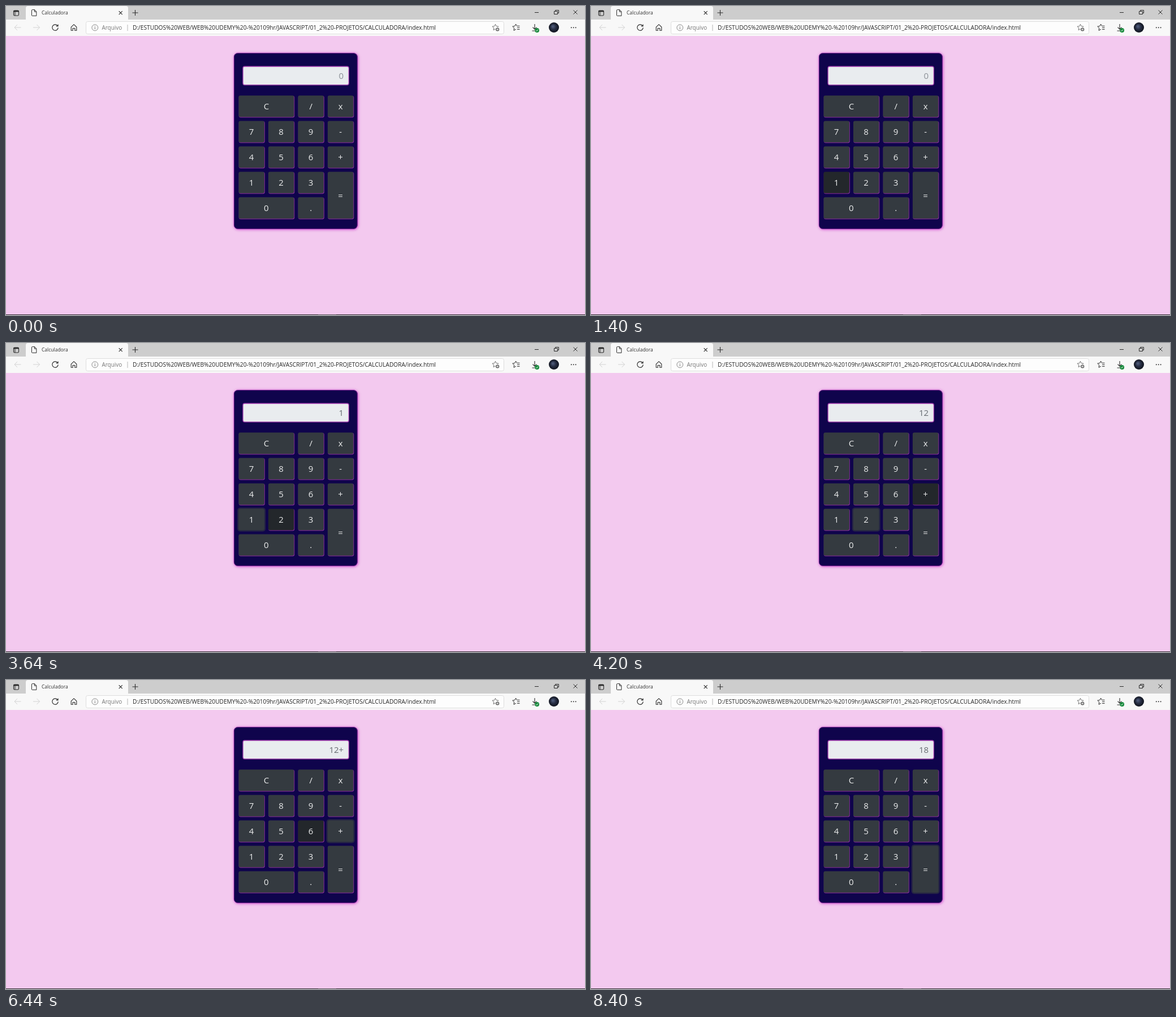
Recreate the animation shown at these times as an HTML page with a canvas. Size 1024 by 547 pixels, loop 9.8 s.

```html
<!DOCTYPE html>
<html lang="pt-BR">
<head>
<meta charset="utf-8">
<title>Calculadora</title>
<style>
html, body { margin: 0; width: 100%; height: 100%; overflow: hidden; background: #f3c9ef; }
canvas { display: block; width: 1024px; height: 547px; }
</style>
</head>
<body>
<canvas id="stage" width="1024" height="547"></canvas>
<script>
const ctx = document.getElementById('stage').getContext('2d');
const STEP = 1400;
const PRESSES = ['1', '2', '+', '6', '='];
const INK = '#2b2b2b';

// label, column, row, column span, row span
const KEYS = [
  ['C', 0, 0, 2, 1], ['/', 2, 0, 1, 1], ['x', 3, 0, 1, 1],
  ['7', 0, 1, 1, 1], ['8', 1, 1, 1, 1], ['9', 2, 1, 1, 1], ['-', 3, 1, 1, 1],
  ['4', 0, 2, 1, 1], ['5', 1, 2, 1, 1], ['6', 2, 2, 1, 1], ['+', 3, 2, 1, 1],
  ['1', 0, 3, 1, 1], ['2', 1, 3, 1, 1], ['3', 2, 3, 1, 1], ['=', 3, 3, 1, 2],
  ['0', 0, 4, 2, 1], ['.', 2, 4, 1, 1]
];

function rect(x, y, w, h, color) {
  ctx.fillStyle = color;
  ctx.fillRect(x, y, w, h);
}

function box(x, y, w, h, r, fill, stroke, width = 1) {
  ctx.beginPath();
  ctx.roundRect(x, y, w, h, r);
  if (fill) { ctx.fillStyle = fill; ctx.fill(); }
  if (stroke) { ctx.strokeStyle = stroke; ctx.lineWidth = width; ctx.stroke(); }
}

function disc(x, y, r, fill, stroke, width = 1) {
  box(x - r, y - r, r * 2, r * 2, r, fill, stroke, width);
}

function path(d, color = INK, width = 1, dx = 0, dy = 0) {
  ctx.save();
  ctx.translate(dx, dy);
  ctx.strokeStyle = color;
  ctx.lineWidth = width;
  ctx.stroke(new Path2D(d));
  ctx.restore();
}

function text(str, x, y, size, color, align = 'left') {
  ctx.font = `${size}px "Open Sans", "Noto Sans", sans-serif`;
  ctx.textAlign = align;
  ctx.fillStyle = color;
  ctx.fillText(str, x, y);
}

function star(cx, cy, r) {
  let d = '';
  for (let i = 0; i < 10; i++) {
    const a = i * Math.PI / 5 - Math.PI / 2;
    const q = i % 2 ? r * 0.48 : r;
    d += `${i ? 'L' : 'M'}${cx + q * Math.cos(a)} ${cy + q * Math.sin(a)}`;
  }
  return d + 'Z';
}

function drawTabs() {
  rect(0, 0, 1024, 24, '#cdcdcd');
  box(13.5, 8, 9, 9, 1.8, null, INK, 1.1);
  rect(13.5, 8, 9, 2.4, INK);
  rect(15.4, 10, 1, 7, INK);

  box(35, 0, 181, 28, [4, 4, 0, 0], '#f8f8f8');
  path('M46.6 6.6H50.6L53.8 10V17.4H46.6Q45.4 17.4 45.4 16.2V7.8Q45.4 6.6 46.6 6.6ZM50.4 6.8V10.2H53.6', INK, 1);
  text('Calculadora', 63, 15.2, 8.5, '#303030');
  path('M199.7 9.2L205.7 15.2M205.7 9.2L199.7 15.2', INK, 1.1);
  path('M223.5 12H233.5M228.5 7V17', INK, 1.1);

  path('M935 11.5H942', INK, 1);
  path('M969.5 9.5H975.5V14.5H969.5ZM971.5 9.5V7.5H977.5V12.5H975.5', INK, 1);
  path('M1003.5 7.5L1010.5 14.5M1010.5 7.5L1003.5 14.5', INK, 1);
}

function drawAvatar() {
  const g = ctx.createRadialGradient(967, 36, 1, 969, 38, 9);
  g.addColorStop(0, '#4c5876');
  g.addColorStop(0.5, '#242b40');
  g.addColorStop(1, '#10131d');
  disc(969, 38, 9, g);
}

function drawToolbar() {
  rect(0, 24, 1024, 29, '#f8f8f8');
  const arrow = 'M6 0H-5.5M-0.5 -5L-5.5 0L-0.5 5';
  path(arrow, '#d2d2d2', 1, 20.5, 38);
  path('M-6 0H5.5M0.5 -5L5.5 0L0.5 5', '#d2d2d2', 1, 54, 38);
  path('M91.2 35A5.2 5.2 0 1 0 92.2 38.4M92 32.4V35.6H88.7', INK, 1.15);
  path('M115.2 37.3L120 32.7L124.8 37.3V43.3H121.8V39.5H118.2V43.3H115.2Z', INK, 1.1);

  box(141.5, 27.5, 739, 22, 3, '#fdfdfd', '#dedede');
  disc(157.3, 38.3, 5.4, null, '#7b7b7b', 0.9);
  rect(156.8, 37.3, 1, 4, '#7b7b7b');
  rect(156.8, 35.2, 1, 1.1, '#7b7b7b');
  text('Arquivo', 169.5, 42, 9.9, '#767676');
  rect(214.5, 33, 1, 11, '#b5b5b5');
  text('D:/ESTUDOS%20WEB/WEB%20UDEMY%20-%20109hr/JAVASCRIPT/01_2%20-PROJETOS/CALCULADORA/index.html',
    224, 42, 10.18, '#262626');

  path(star(865.5, 38, 5.8), '#666', 0.9);
  disc(869.2, 41.5, 3.6, '#666', '#fdfdfd', 0.8);
  path('M867.3 41.5H871.1M869.2 39.6V43.4', '#fdfdfd', 0.9);

  path('M902 41.2L898 43.3L898.8 39L895.8 36.2L899.8 35.6L901.6 32L903.4 35.6M904 35.5H908.5M904 38.5H908.5M904 41.5H908.5', INK, 1);
  path('M935 32V41M931.5 37.7L935 41.2L938.5 37.7M930.5 44H936', INK, 1.1);
  disc(939.2, 43, 3.9, '#198b3e');
  path('M937.3 43.1L938.7 44.5L941.2 41.7', '#fff', 0.9);
  drawAvatar();
  for (let i = 0; i < 3; i++) disc(999.8 + i * 3.9, 38.3, 0.95, INK);
}

function drawPanel() {
  rect(0, 53, 1024, 494, '#f3c9ef');
  ctx.save();
  ctx.shadowColor = '#c832c8';
  ctx.shadowBlur = 5;
  ctx.shadowOffsetX = 0.8;
  ctx.shadowOffsetY = 0.8;
  box(403, 83.3, 218.6, 311.4, 7, '#0f044c');
  ctx.restore();
  box(403.4, 83.7, 217.8, 310.6, 6.6, null, '#7a1c92', 0.8);
}

function drawDisplay(value) {
  box(419, 107, 187.3, 32.8, 3, '#e9ecef', '#a23aae', 1.3);
  text(value || '0', 597.2, 129.4, 15, value ? '#666b71' : '#8c9197', 'right');
}

function drawKey([label, col, row, cols, rows], hover, focus) {
  const x = 411.4 + col * 52.5;
  const y = 158.6 + row * 45;
  const w = cols * 52.5 - 7;
  const h = rows * 45 - 7;
  if (label === focus) {
    box(x - 2.2, y - 2.2, w + 4.4, h + 4.4, 5, 'rgba(52,58,64,.6)');
  } else {
    box(x + 0.4, y + 0.4, w + 0.5, h + 0.5, 3.3, '#8c2c9c');
  }
  box(x, y, w, h, 3, label === hover ? '#23272b' : '#343a40');
  text(label, x + w / 2, y + h / 2 + 5.6, 15, '#eceded', 'center');
}

function displayValue(count) {
  const typed = PRESSES.slice(0, count).join('');
  if (!typed.endsWith('=')) return typed;
  return String(typed.slice(0, -1).split('+').reduce((sum, n) => sum + Number(n), 0));
}

function draw(ms) {
  const step = Math.floor(ms / STEP) % (PRESSES.length + 2);
  const hover = PRESSES[step - 1];
  const focus = PRESSES[step - 2];
  drawTabs();
  drawToolbar();
  drawPanel();
  drawDisplay(displayValue(Math.max(0, step - 1)));
  for (const key of KEYS) drawKey(key, hover, focus);
  rect(0, 546, 1024, 1, '#302c30');
  rect(552, 546, 32, 1, '#585458');
}

const start = performance.now();
function tick() {
  draw(performance.now() - start);
  requestAnimationFrame(tick);
}
tick();
</script>
</body>
</html>
```
